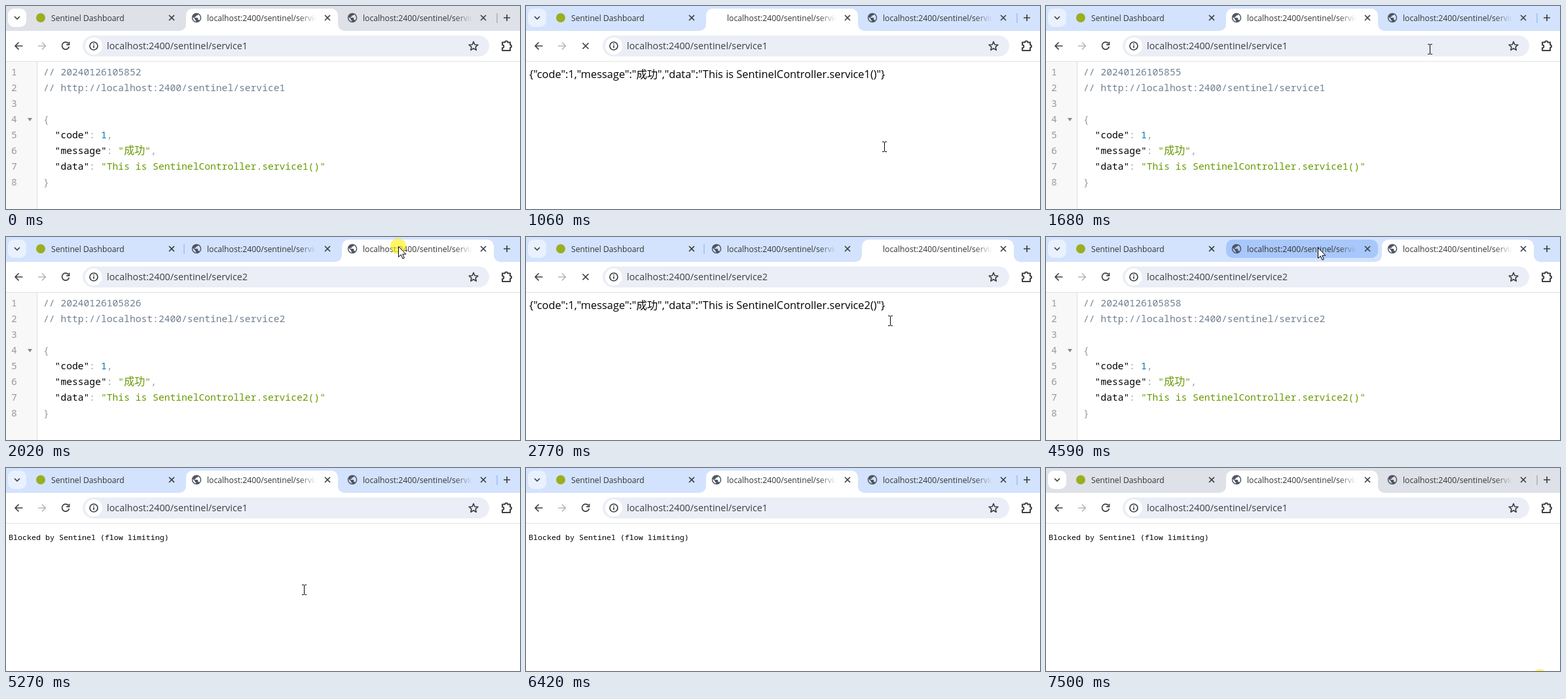
An HTML page for the animation above (7560 ms loop, 785 px wide and 310 px high).

```html
<!DOCTYPE html>
<html lang="en">
<head>
<meta charset="utf-8">
<title>Flow limiting demo</title>
<style>
  html, body { margin: 0; width: 100%; height: 100%; overflow: hidden; background: #fff; }
  svg { display: block; width: 785px; height: 310px; }
  text { white-space: pre; font-family: "Open Sans", "Noto Sans CJK SC", sans-serif; }
  .line { fill: none; stroke: #3c4043; stroke-width: 1.7; stroke-linejoin: round; }
  #json text { font: 14.66px "Noto Sans Mono", "Noto Sans CJK SC", monospace; }
  #json .num { fill: #999; }
  .comment { fill: #708090; }
  .mark { fill: #999; }
  .string { fill: #690; }
  .number { fill: #07a; }
  .cjk { font-size: 16px; font-family: "Noto Sans CJK SC", sans-serif; }
</style>
</head>
<body>
<svg viewBox="0 0 785 310">
  <defs>
    <linearGradient id="fade" gradientUnits="userSpaceOnUse" x1="172" x2="199" y1="0" y2="0">
      <stop stop-color="#333"/><stop offset="1" stop-color="#333" stop-opacity="0"/>
    </linearGradient>
    <path id="globe" fill="#4d5561" transform="translate(7.4 9.4) scale(.72)" d="M12 2C6.48 2 2 6.48 2 12s4.48 10 10 10 10-4.48 10-10S17.52 2 12 2zm-1 17.93c-3.95-.49-7-3.85-7-7.93 0-.62.08-1.21.21-1.79L9 15v1c0 1.1.9 2 2 2v1.93zm6.9-2.54c-.26-.81-1-1.39-1.9-1.39h-1v-3c0-.55-.45-1-1-1H8v-2h2c.55 0 1-.45 1-1V7h2c1.1 0 2-.9 2-2v-.41c2.93 1.19 5 4.06 5 7.41 0 2.08-.8 3.97-2.1 5.39z"/>
  </defs>

  <rect id="strip" width="785" height="38"/>
  <rect id="menu" x="3" y="4" width="28" height="28" rx="9"/>
  <path class="line" d="M13 16l4 4 4-4"/>
  <path id="sep1" d="M272 11v15" stroke-width="2"/>
  <path id="sep2" d="M750 11v15" stroke-width="2"/>
  <g id="tabs"></g>
  <path class="line" d="M760 18h10M765 13v10"/>

  <rect y="38" width="785" height="46" fill="#fff"/>
  <path class="line" d="M25.500 61H14M19.500 55.500L14 61l5.500 5.500"/>
  <path class="line" style="stroke:#b4b7bb" d="M49 61h11.500M55 55.500l5.500 5.500-5.500 5.500"/>
  <path id="reload" class="line" d="M95.300 57.200A5.500 5.500 0 1 0 96.400 62M96.600 54.800v4.400h-4.400"/>
  <path id="stop" class="line" d="M86.500 56.500l9 9M95.500 56.500l-9 9"/>
  <rect x="117" y="45" width="621" height="32" rx="16" fill="#ebeef6"/>
  <circle cx="134" cy="61" r="13" fill="#fff"/>
  <circle class="line" cx="134" cy="61" r="6"/>
  <path class="line" d="M134 60v4M134 57.200v1.600"/>
  <text x="154" y="66" font-size="14.36" fill="#3a3d42">localhost:2400/sentinel/service<tspan class="service"></tspan></text>
  <path class="line" d="M714 54.500l1.900 4.500 4.900.4-3.700 3.200 1.100 4.800-4.200-2.600-4.200 2.600 1.100-4.800-3.700-3.200 4.900-.4z"/>
  <path class="line" style="stroke-width:2" d="M758 55.500h4a2 2 0 0 1 4 0h4v4a2 2 0 0 1 0 4v4.500h-12v-4a2.200 2.200 0 0 0 0-4.500z"/>
  <path d="M0 84.500h785" stroke="#e0e2e6"/>

  <g id="json">
    <rect y="85" width="47" height="225" fill="#f7f8f7"/>
    <path d="M47.500 85v225" stroke="#ddd"/>
    <g id="numbers"></g>
    <path id="fold" d="M33 171h7l-3.500 5z" fill="#888"/>
    <text x="57" y="106" class="comment">// 20240126<tspan id="stamp"></tspan></text>
    <text x="57" y="130" class="comment">// http://localhost:2400/sentinel/service<tspan class="service"></tspan></text>
    <text x="57" y="178" class="mark">{</text>
    <text x="74.600" y="202">"code"<tspan class="mark">: </tspan><tspan class="number">1</tspan><tspan class="mark">,</tspan></text>
    <text x="74.600" y="226">"message"<tspan class="mark">: </tspan><tspan class="string">"<tspan class="cjk">成功</tspan>"</tspan><tspan class="mark">,</tspan></text>
    <text x="74.600" y="250">"data"<tspan class="mark">: </tspan><tspan class="string">"This is SentinelController.service<tspan class="service"></tspan>()"</tspan></text>
    <text x="57" y="274" class="mark">}</text>
  </g>
  <text id="raw" x="5" y="110" font-size="16.37">{"code":1,"message":"成功","data":"This is SentinelController.service<tspan class="service"></tspan>()"}</text>
  <text id="blocked" x="4" y="110" style="font:11.67px 'Noto Sans Mono',monospace">Blocked by Sentinel (flow limiting)</text>

  <g id="pointer">
    <circle id="click" r="12" fill="#fff000" opacity=".6"/>
    <path id="arrow" d="M.5.5v16L4.300 13l2.600 6 2.400-1-2.500-5.800h5z" fill="#fff" stroke="#000"/>
    <path id="beam" d="M-3 -7.500h3M1 -7.500h3M.5 -7v14M-3 7.500h3M1 7.500h3" fill="none" stroke="#000"/>
  </g>
</svg>
<script>
const LOOP = 7560;
const TAB_X = [37, 275, 513], TAB_WIDTH = 232;
const $ = id => document.getElementById(id);
const show = (id, on) => { $(id).style.display = on ? '' : 'none'; };

const url = 'localhost:2400/sentinel/service';
$('tabs').innerHTML = ['Sentinel Dashboard', url + 1, url + 2].map((title, i) => `
  <g transform="translate(${TAB_X[i]})">
    <path id="active${i}" fill="#fff" d="M-10 38a10 10 0 0 0 10-10V14a10 10 0 0 1 10-10H222a10 10 0 0 1 10 10V28a10 10 0 0 0 10 10z"/>
    <rect id="hover${i}" y="4" width="${TAB_WIDTH}" height="28" rx="10" fill="#a8c7fa"/>
    <g id="icon${i}">${i ? '<use href="#globe"/>' : '<circle cx="16" cy="18" r="7" fill="#9aae1f"/>'}</g>
    <text x="32" y="22.500" font-size="12.2" fill="url(#fade)">${title.slice(0, 30)}</text>
    <path class="line" d="M212 14l8 8M220 14l-8 8"/>
  </g>`).join('');
$('numbers').innerHTML = Array.from({ length: 8 }, (_, i) =>
  `<text class="num" x="8" y="${106 + 24 * i}">${i + 1}</text>`).join('');

// Each entry changes part of the browser state from its time on.
const events = [
  [0, { focused: false, tab: 1, page: 'json', stamp: 105852, fold: true, loading: false, click: false, arrow: false }],
  [660, { focused: true, click: true }],
  [790, { click: false }],
  [1060, { page: 'raw', loading: true }],
  [1150, { page: 'json', loading: false, stamp: 105855, fold: false }],
  [1340, { fold: true }],
  [2020, { tab: 2, stamp: 105826, click: true }],
  [2155, { click: false }],
  [2770, { page: 'raw', loading: true }],
  [2850, { page: 'json', loading: false, stamp: 105857, fold: false }],
  [3180, { fold: true }],
  [3850, { page: 'raw', loading: true }],
  [3925, { page: 'json', loading: false, stamp: 105858, fold: false }],
  [4200, { fold: true }],
  [4720, { tab: 1, stamp: 105855, click: true }],
  [4860, { click: false }],
  [5130, { page: 'blocked', loading: true }],
  [5270, { loading: false }],
  [5340, { arrow: true }],
  [7430, { click: true }],
  [7500, { focused: false }],
];

// Pointer moves in discrete steps: start, end, steps, x, y, easing.
const linear = p => p, smooth = p => p * p * (3 - 2 * p);
const moves = [
  [250, 460, 4, 547, 215, linear],
  [1340, 1880, 9, 599, 14, smooth],
  [2220, 2700, 8, 556, 128, smooth],
  [3450, 3450, 1, 555, 128, linear],
  [3990, 4590, 9, 415, 16, smooth],
  [4860, 5060, 4, 455, 186, smooth],
  [5340, 5400, 2, 446, 168, linear],
  [5670, 6420, 12, 754, 319, linear],
];

function pointerAt(t) {
  let x = 711, y = 318;
  for (const [start, end, steps, toX, toY, ease] of moves) {
    if (t < start) break;
    const interval = (end - start) / Math.max(1, steps - 1);
    const step = t >= end ? steps : Math.floor((t - start) / interval) + 1;
    const p = ease(step / steps);
    x += (toX - x) * p;
    y += (toY - y) * p;
  }
  return [Math.round(x), Math.round(y)];
}

function draw(t) {
  const state = Object.assign({}, ...events.filter(e => e[0] <= t).map(e => e[1]));
  const { focused, tab, page, loading } = state;
  const [x, y] = pointerAt(t);
  const hovered = y < 38 ? TAB_X.findIndex(left => x >= left && x < left + TAB_WIDTH) : -1;

  $('strip').setAttribute('fill', focused ? '#d3e3fd' : '#dee1e8');
  $('menu').setAttribute('fill', focused ? '#e9f1fe' : '#fff');
  TAB_X.forEach((_, i) => {
    show('active' + i, i === tab);
    show('hover' + i, i === hovered && i !== tab);
    show('icon' + i, !(loading && i === tab));
  });
  for (const i of [1, 2]) {
    show('sep' + i, tab !== i && hovered !== i);
    $('sep' + i).setAttribute('stroke', focused ? '#a8c7fa' : '#b8bcc4');
  }
  show('reload', !loading);
  show('stop', loading);

  for (const id of ['json', 'raw', 'blocked']) show(id, id === page);
  show('fold', state.fold);
  $('stamp').textContent = state.stamp;
  document.querySelectorAll('.service').forEach(el => { el.textContent = tab; });

  const overText = y > 84 ? !state.arrow : y > 45 && y < 77 && x > 150 && x < 695;
  show('beam', overText);
  show('arrow', !overText);
  show('click', state.click);
  $('pointer').setAttribute('transform', `translate(${x} ${y})`);
}

function tick() {
  draw(Math.round(performance.now()) % LOOP);
  requestAnimationFrame(tick);
}
tick();
</script>
</body>
</html>
```
